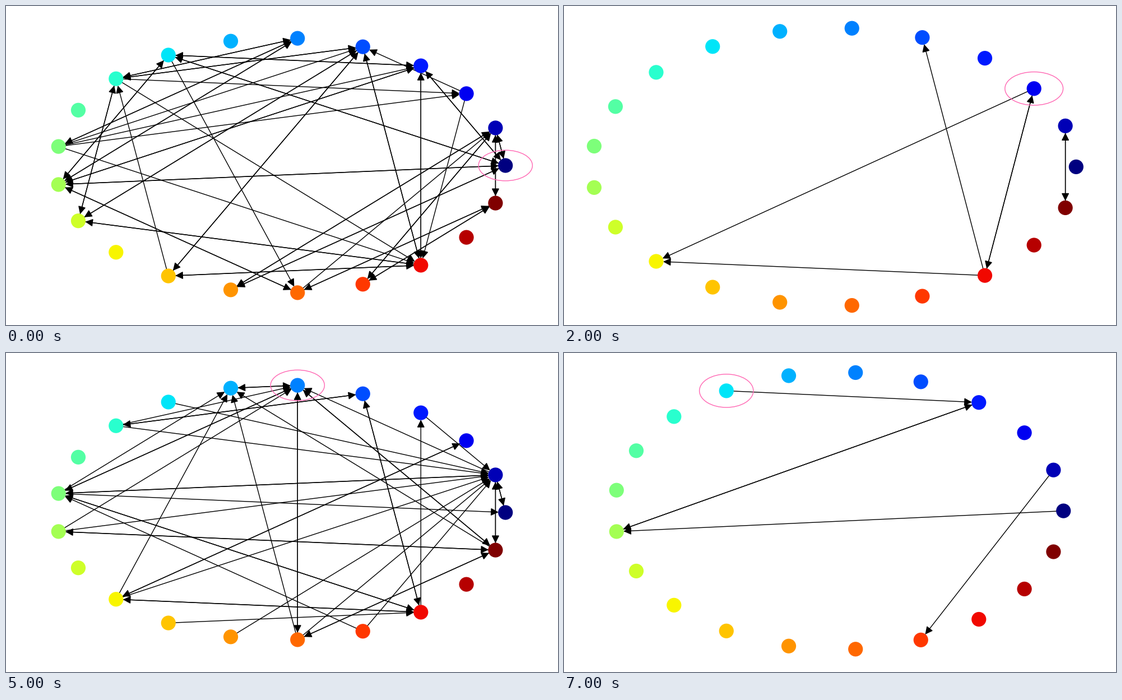
Write a matplotlib script that moves like this. It is 985 px wide and 569 px high and loops after 8 s.

```python
import numpy as np
import matplotlib.pyplot as plt
from matplotlib.animation import FuncAnimation
from matplotlib.patches import Ellipse, FancyArrowPatch

W, H, DPI = 985, 569, 128
PX = 72 / DPI            # points per pixel
N = 21
BORDER = 10

# One network per second: "a-b" links both ways, "a>b" one way.
STEPS = [
    """5-8 4-8 5-10 5-11 7-11 11-3 10>4 10>3 10>2 4-12 4-14 7-3 7-0 8>2
       8>18 7>16 8-12 14>8 10>18 12-18 14-18 4-18 3-18 2>18 2>4 3-0 0-1
       1-20 0-11 11-16 1-15 0-15 1-17 16>1 17-20 16-20""",
    """5-8 4-8 7-3 7-0 11-3 0-11 0-1 1-20 14-18 4-18 1-15 1-17 11>5 10>4
       8>18 12-18 3-0""",
    "2>13 2-18 18>4 18>13 1-20",
    """4-8 7-3 7-0 1>6 20>6 3-11 11>7 8>18 3>1 3-0 0>1 1-20 3>15 3>16
       2>13 0-11 11-20 0>15 0>17 1-17 4-18 18>13 14-18 14>13 14>19""",
    """5-6 5-8 4-8 3>7 7>1 7>0 10>6 11>5 4-10 6-13 4-13 16>6 16>5 4-16
       4-18 4-20 4>1 5>1 5-20 6>1 6-20 10>1 11>1 13>1 2-13 1-15 16>1 17>1
       0-1 1-20 2-18 8-18 8>14 10-18 17>10 11-20 16>11 12>10 12>13 10>13
       13-18 14>13 17>13 16>13 14-18 13>20 16-20 16>18 17>15""",
    """5-6 8>5 4-8 10>6 11>5 10-5 13>6 16>6 5-16 4-18 7>1 8>1 10-1 11>1
       13>1 2-13 1>5 20-5 20>6 0-1 1-20 15>1 16>1 17>1 10-18 17>10 11-20
       13-18 14>18 16-20 10>0 3>1 18>3""",
    """5>6 8>6 10>6 13>6 16>6 1>6 20>6 19>6 8>5 5-10 11>5 13>5 5-16 3>5
       1>5 20>5 19>5 7>3 7>1 8>1 7>16 8>16 8-10 11>10 3-10 11>3 2-10 1-10
       11>1 10>0 20>10 18>10 10-16 17>10 14>10 13>10 2-13 13>1 13-18 14>18
       11-20 15>3 15>1 15>0 16>3 17>3 18>3 20>3 3>1 2>1 4-18 19>2 19>1
       1-17 1-16 16-20 17-20 19>17 19>16 1-20 0-1""",
    "7>3 3-11 0>11 1>17",
]

angle = 2 * np.pi * np.arange(N) / N
RING = np.column_stack([np.cos(angle), np.sin(angle)])
COLORS = plt.get_cmap("jet")(np.linspace(0, 1, N))


def parse(text):
    edges = []
    for item in text.split():
        both = "-" in item
        a, b = map(int, item.split("-" if both else ">"))
        edges.append((a, b))
        if both:
            edges.append((b, a))
    return edges


def layout(edges):
    """Fit the ring to the stage; the linked nodes get 5 % padding."""
    linked = RING[np.unique(edges)]
    low, high = linked.min(0), linked.max(0)
    pad = 0.05 * (high - low)
    low = np.minimum(low - pad, RING.min(0))
    high = np.maximum(high + pad, RING.max(0))
    size = np.array([W, H])
    scale = (size - 2 * BORDER) / 1.1 / (high - low)
    flip = np.array([1, -1])
    pos = size / 2 + flip * (RING - (low + high) / 2) * scale
    return pos, scale


fig = plt.figure(figsize=(W / DPI, H / DPI), dpi=DPI, facecolor="white")
ax = fig.add_axes([0, 0, 1, 1])


def draw(step):
    ax.clear()
    ax.axis("off")
    edges = parse(STEPS[step])
    pos, scale = layout(edges)
    for a, b in edges:
        ax.add_patch(FancyArrowPatch(
            pos[a], pos[b], arrowstyle="-|>", mutation_scale=28.6 * PX,
            shrinkA=12.4 * PX, shrinkB=12.4 * PX, lw=1.42 * PX,
            color="black", zorder=1))
    ax.add_patch(Ellipse(pos[step], *(0.24 * scale), fill=False,
                         ec="hotpink", lw=1.42 * PX, zorder=1))
    ax.scatter(*pos.T, s=(26.2 * PX) ** 2, c=COLORS, linewidths=0, zorder=2)
    ax.set_xlim(0, W)
    ax.set_ylim(H, 0)
    return []


anim = FuncAnimation(fig, draw, frames=len(STEPS), interval=1000,
                     repeat=True, repeat_delay=0)
plt.show()
```
